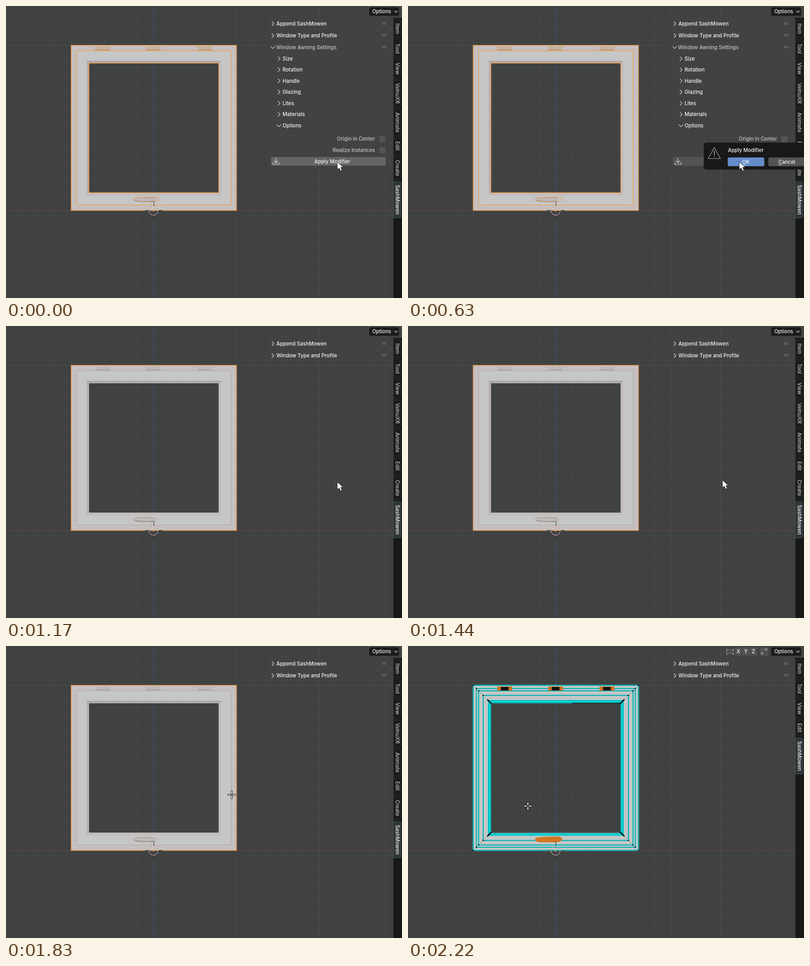
Write an HTML page that moves like this. It is 872 by 642 pixels and loops after 2.28 s.

```html
<!DOCTYPE html>
<html lang="en">
<head>
<meta charset="utf-8">
<title>Apply window modifier</title>
<style>
  html, body { margin: 0; width: 100%; height: 100%; overflow: hidden; background: #404241; }
  svg { display: block; width: 872px; height: 642px; }
  text { font: 500 11.2px Inter, "Noto Sans", sans-serif; fill: #f4f4f4; }
  .dim { fill: #c6c4c4; }
  .mid { text-anchor: middle; }
  .end { text-anchor: end; }
  .line { fill: none; stroke: #d8d8d8; stroke-width: 1.2; stroke-linecap: round; stroke-linejoin: round; }
  .thin { fill: none; stroke: #bdbdbd; stroke-width: 1; }
  .orange { fill: none; stroke: #ec9b4c; stroke-width: 1.5; }
  .fine { fill: none; stroke: #e59c55; stroke-width: 1; }
</style>
</head>
<body>
<svg id="stage" viewBox="0 0 872 642"></svg>
<script>
const LOOP = 2280, STEP = 30;
const PRESS = 270, DIALOG = 420, CONFIRM = 1050, APPLIED = 1170, EDIT = 2100;

const rect = (x, y, w, h, fill, r = 0, more = '') =>
  `<rect x="${x}" y="${y}" width="${w}" height="${h}" rx="${r}" fill="${fill}" ${more}/>`;
const path = (d, more = 'class="line"') => `<path d="${d}" ${more}/>`;
const text = (x, y, s, cls = '') => `<text x="${x}" y="${y}" class="${cls}">${s}</text>`;
const group = (id, body) => `<g id="${id}">${body}</g>`;
const range = (n, fn) => Array.from({ length: n }, (_, i) => fn(i)).join('');

// Rectangle of the window frame, inset by d
const ring = (d, more) => rect(143.5 + d, 86.5 + d, 364 - 2 * d, 363 - 2 * d, 'none', 0, more);
const hinges = fn => [197, 309, 422].map(fn).join('');
const handle = 'M281 425.5Q282 421.5 291 421.5L325 420Q338 420 338.5 425Q337 430 325 430.5L291 430Q282 430 281 425.5Z';

function grid() {
  const cell = 36.35;
  const lines = range(26, i => {
    const k = i - 9, x = 325.5 + k * cell, y = 449.5 + (k - 5) * cell;
    const tint = strong => `stroke="${strong ? '#505251' : '#494b4a'}"`;
    return path(`M${x} 0V642`, tint(k % 10 === 0)) + path(`M0 ${y}H853`, tint((k - 5) % 10 === 0));
  });
  return lines + path('M0 449.5H853', 'stroke="#7c3a3b"') + path('M325.5 0V642', 'stroke="#35597f"');
}

function frame() {
  return path('M143 86H508V450H143ZM183 125V411H468V125Z', 'fill="#c5c0bf" fill-rule="evenodd"')
    + path('M156 98H495.5V438H156ZM183 125V411H468V125Z', 'fill="#c6c6c6" fill-rule="evenodd"')
    + path('M177 120H474V416H177ZM183 125V411H468V125Z', 'fill="#c0bab9" fill-rule="evenodd"')
    + path('M178 122.5H472.5', 'stroke="#a9a3a2" stroke-width="3"')
    + path('M180 124V413', 'stroke="#b2acab" stroke-width="2"')
    + path('M471 124V413M180 413H471', 'stroke="#cfc9c8" fill="none"')
    + ring(12, 'stroke="#aaa5a4"') + ring(39, 'stroke="#a7a3a1"')
    + rect(268, 416, 80, 18, 'url(#glow)')
    + hinges(x => rect(x, 90, 31, 7, '#bcb7b6', 1) + path(`M${x} 96.5h31`, 'stroke="#99918f"'))
    + path('M281 425Q283 421.5 291 421.5L325 422Q330 422 329.5 426Q328 430 322 430L291 429.5Q283 429.5 281 425Z',
      'fill="#c0bab8" stroke="#9c9492"')
    + path('M283 428Q300 430.5 325 429.5', 'stroke="#827b79" fill="none"')
    + ring(0, 'class="orange"');
}

function outlines() {
  return ring(12, 'class="orange" style="stroke-width:1.2"') + ring(39, 'class="orange"')
    + hinges(x => path(`M${x} 97.5V90.5h31V97.5h-4l-2 -3h-19l-2 3ZM${x + 5} 97.5h21`, 'class="fine"'))
    + path(handle, 'class="fine"');
}

function mesh() {
  const cyan = 'stroke="#08e9ec" stroke-width="', dark = 'stroke="#0f7578"';
  const corners = [[143.5, 86.5, 1, 1], [507.5, 86.5, -1, 1], [143.5, 449.5, 1, -1], [507.5, 449.5, -1, -1]];
  const dots = corners.map(([x, y, sx, sy]) => {
    const at = d => `${x + sx * d} ${y + sy * d}`;
    return path(`M${at(0)}L${at(33)}`, 'stroke="#1c7477" stroke-dasharray="3 3"')
      + path(`M${at(32)}L${at(40)}`, 'stroke="#050505" stroke-width="2.6"')
      + [0, 7, 12, 22, 32].map(d =>
        `<circle cx="${x + sx * d}" cy="${y + sy * d}" r="1.4" fill="#050505"/>`).join('');
  }).join('');
  return path('M143 86H508V450H143ZM183 125V411H468V125Z', 'fill="#c5c5c5" fill-rule="evenodd"')
    + [0, 7, 12, 22].map(d => ring(d, cyan + '2.4"') + ring(d, dark)).join('')
    + ring(36, cyan + '7.6"') + ring(34, dark) + ring(38, dark)
    + ring(40, 'stroke="#383838"')
    + path('M184 410.5H467', 'stroke="#8b9393"') + path('M362 125.5H468', 'stroke="#123c3e"')
    + dots
    + hinges(x => rect(x - .5, 89, 33, 9, '#ce7522', 1) + rect(x + 7.5, 90, 17, 7.5, '#101010', 1))
    + path(handle, 'fill="#d17622" stroke="#d17622" stroke-width="2.5"');
}

const cursor3d = () =>
  path('M306 449.5H317M334 449.5H345M325.5 429V440M325.5 460V470', 'stroke="#2b2b2b"')
  + '<circle cx="325" cy="450" r="10" fill="none" stroke="#f2eeee"/>'
  + '<circle cx="325" cy="450" r="10" fill="none" stroke="#c25551" stroke-dasharray="3.93"/>'
  + '<circle cx="325" cy="450" r="1.7" fill="#f0a050"/>';

const right = (x, y) => path(`M${x - 2.5} ${y - 4.5}l4.5 4.5l-4.5 4.5`);
const down = (x, y) => path(`M${x - 4.5} ${y - 2.2}l4.5 4.5l4.5 -4.5`);
const grip = y => range(8, i => rect(828 + i % 4 * 2.8, y - 3 + (i >> 2) * 3, 1.3, 1.3, '#a5a5a5'));

const header = (y, s) => right(588, y) + text(595.5, y + 4, s) + grip(y);

function settings() {
  const rows = ['Size', 'Rotation', 'Handle', 'Glazing', 'Lites', 'Materials'];
  return rect(577, 78, 273, 282, '#414342')
    + down(587.5, 91) + text(595, 95, 'Window Awning Settings', 'dim') + grip(91)
    + rows.map((s, i) => right(601.5, 115.6 + i * 24.55) + text(609, 119.6 + i * 24.55, s)).join('')
    + down(601, 263) + text(609, 267, 'Options')
    + text(812.5, 296.3, 'Origin in Center', 'dim end') + rect(822, 286, 13.5, 13.5, '#545454', 2.5)
    + text(812.5, 320.8, 'Realize Instances', 'dim end') + rect(822, 310.5, 13.5, 13.5, '#545454', 2.5)
    + rect(583.5, 332, 252.5, 19, '#656565', 3, 'id="apply"')
    + path('M594.5 335v9M590.5 340.5l4 4l4 -4M588 344v4h13v-4')
    + text(718.5, 345.5, 'Apply Modifier', 'mid');
}

function tabs(list) {
  return list.map(([s, y, h], i) => {
    const on = i === list.length - 1;
    return path(`M853 ${y}h13q4 0 4 4v${h - 8}q0 4 -4 4h-13Z`,
      `fill="${on ? '#303535' : '#1c1c1c'}" stroke="${on ? '#3b5352' : '#303333'}"`)
      + `<text class="mid ${on ? '' : 'dim'}" transform="translate(857.5 ${y + h / 2}) rotate(90)">${s}</text>`;
  }).join('');
}

const baseTabs = [['Item', 30, 40], ['Tool', 74, 39], ['View', 117, 41]];
const objectTabs = [...baseTabs, ['VelnuXR', 162, 60], ['Animate', 226, 60], ['Edit', 290, 36],
  ['Create', 330, 52], ['SashMowen', 386, 80]];
const editTabs = [...baseTabs, ['Edit', 162, 36], ['SashMowen', 202, 80]];

const editTools = () =>
  path('M709 6v13', 'class="thin" stroke-dasharray="2 2"')
  + path('M707 10l-4 -3h-1.5v4l2 1.5l-2 2v4h2l3.5 -4M711 10l4 -3h1.5v4l-2 1.5l2 2v4h-2l-3.5 -4', 'class="thin"')
  + ['X', 'Y', 'Z'].map((s, i) => rect(719.5 + i * 16.7, 3, 16, 18.5, '#515151', 2.5)
    + text(727.3 + i * 16.7, 16, s, 'mid')).join('')
  + rect(775, 3, 18.5, 18.5, '#515151', 3)
  + path('M779 14v-3q0 -3 4 -3h4', 'class="thin" stroke-dasharray="2 2"')
  + path('M778 15h3v3h-3zM787 6h3v3h-3z', 'class="thin"');

const dialog = () =>
  rect(651.5, 300.5, 240, 59, '#181818', 5, 'stroke="#242424"')
  + path('M674.5 311L688 335.5H661Z', 'class="line" style="stroke:#aaa"')
  + path('M674.5 319v8.5M674.5 331v.6', 'class="line" style="stroke:#bbb;stroke-width:1.6"')
  + text(704.5, 321, 'Apply Modifier')
  + rect(704, 333, 80.5, 19.3, '#658cca', 3, 'id="ok"') + text(744, 347, 'OK', 'mid')
  + rect(793.5, 333, 81, 19.3, '#545454', 3) + text(834, 347, 'Cancel', 'mid')
  + path('M736 349.5h8M816 349.5h7', 'stroke="#e0e0e0"');

const stage = document.getElementById('stage');
stage.innerHTML =
  '<defs><radialGradient id="glow"><stop offset="0" stop-color="#b9a5a0"/>'
  + '<stop offset="1" stop-color="#c6c0be" stop-opacity="0"/></radialGradient></defs>'
  + rect(0, 0, 872, 642, '#404241') + grid()
  + group('solid', frame()) + group('selected', outlines()) + group('wire', mesh()) + cursor3d()
  + rect(577, 26, 273, 53, '#414342')
  + header(39, 'Append SashMowen') + header(65, 'Window Type and Profile')
  + group('settings', settings())
  + rect(853, 26, 19, 616, '#181818')
  + group('objectTabs', tabs(objectTabs)) + group('editTabs', tabs(editTabs))
  + group('editTools', editTools())
  + rect(799.5, 3, 66, 18.5, '#1b1b1b', 4) + text(806.5, 16, 'Options') + path('M855.5 11l3.2 3.2l3.2 -3.2')
  + group('dialog', dialog())
  + group('arrow', path('M-.5 0V16.5L3.5 12.8L6.5 19.3L9.7 17.9L6.9 11.7H12.2Z', 'fill="#fff" stroke="#222" stroke-width=".8"'))
  + group('cross', path('M-9 0H-1M1 0H9M0 -9V-1M0 1V9', 'stroke="#1b1b1b" stroke-width="4"')
    + path('M-8 0H-2M2 0H8M0 -8V-2M0 2V8', 'stroke="#fff" stroke-width="2"'));

const el = {};
stage.querySelectorAll('[id]').forEach(e => el[e.id] = e);
const show = (id, on) => { el[id].style.display = on ? '' : 'none'; };

// time, x, y, then speed in px per ms
const track = [[1230, 730, 343, 0, 0], [1440, 693, 339, -.4, -.03], [1830, 497, 327, -.7, .02], [2220, 264, 352, -.16, -.03]];

function pointer(t) {
  if (t <= track[0][0]) return [730, 343];
  const i = track.findIndex(k => t <= k[0]);
  if (i < 0) return [264, 352];
  const a = track[i - 1], b = track[i], dt = b[0] - a[0], u = (t - a[0]) / dt;
  const s = u * u * (3 - 2 * u);
  return [1, 2].map(n => Math.round(a[n] + (b[n] - a[n]) * s
    + dt * u * (1 - u) * (a[n + 2] * (1 - u) - b[n + 2] * u)));
}

function draw(now) {
  const t = Math.floor(now % LOOP / STEP) * STEP;
  const asking = t >= DIALOG && t < APPLIED, edit = t >= EDIT;
  show('solid', !edit);
  show('wire', edit);
  show('selected', t < APPLIED);
  show('settings', t < APPLIED);
  show('objectTabs', !edit);
  show('editTabs', edit);
  show('editTools', edit);
  show('dialog', asking);
  el.apply.setAttribute('fill', asking ? '#545454' : t >= PRESS ? '#4772b3' : '#656565');
  el.ok.setAttribute('fill', t >= CONFIRM ? '#4772b3' : '#658cca');

  const [x, y] = pointer(t), inView = x < 577;
  show('arrow', !inView);
  show('cross', inView);
  el[inView ? 'cross' : 'arrow'].setAttribute('transform', `translate(${x} ${y})`);
}

const start = performance.now();
function tick() {
  draw(performance.now() - start);
  requestAnimationFrame(tick);
}
tick();
</script>
</body>
</html>
```
